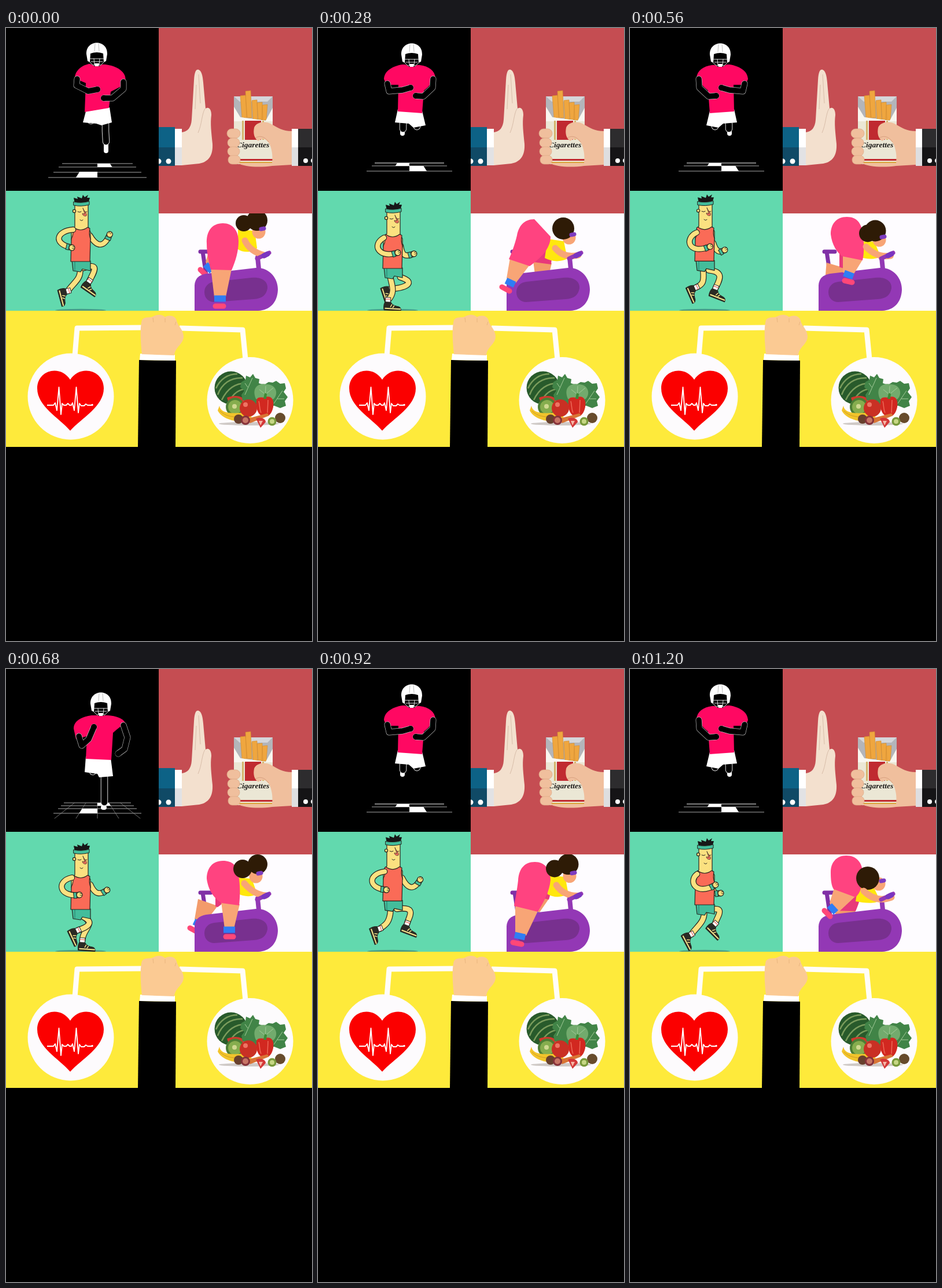
Animation of 529 by 1058 pixels, one loop 1.24 s. Source, as an HTML page with a canvas:

```html
<!DOCTYPE html>
<html lang="en">
<head>
<meta charset="utf-8">
<title>Healthy habits</title>
<style>
html,body{margin:0;width:100%;height:100%;overflow:hidden;background:#000}
svg,canvas{position:absolute;left:0;top:0;display:block}
</style>
</head>
<body>
<svg width="529" height="1058" viewBox="0 0 529 1058">
  <rect width="529" height="1058"/>
  <rect x="264" width="265" height="320" fill="#c54d52"/>
  <rect x="264" y="320" width="265" height="168" fill="#fefcff"/>
  <rect y="488" width="529" height="235" fill="#feea3b"/>

  <!-- refusing hand -->
  <path d="M264 171H292V238H264Z" fill="#0d6286"/>
  <path d="M264 206H292V238H264Z" fill="#104a66"/>
  <path d="M292 174H304V237H292Z" fill="#fff"/>
  <path d="M292 206H304V237H292Z" fill="#e2e2e4"/>
  <path d="M264 225.500A4.500 4.500 0 1 1 264 234.500Z" fill="#fff"/>
  <circle cx="281" cy="230" r="4.500" fill="#fff"/>
  <path d="M304 180C314 179 320 172 321 158L325 90C326 74 329 71 333 72C338 74 340 82 341 94L345 139C351 135 355 141 355 150C353 165 355 180 357 200C358 219 351 231 334 234L304 237Z" fill="#f3e0ce"/>
  <path d="M333 80L336 130M329 98L327 140M344 139C338 150 339 165 332 181" fill="none" stroke="#d8bda9"/>

  <!-- cigarette pack -->
  <path d="M394 118H461V160H394Z" fill="#b3b5ba"/>
  <path d="M394 118L404 127H452L461 118Z" fill="#d5d6da"/>
  <g fill="#efa63f" stroke="#d08a30" stroke-width=".6">
    <path d="M414 109L423 108L425 155L416 155ZM405 117L414 116L417 155L408 155ZM425 125L434 124L435 158L427 158ZM434 129L443 128L444 158L436 158ZM443 133L452 132L450 159L442 159Z"/>
  </g>
  <path d="M394 136L405 154L449 160L461 138V235H394Z" fill="#ebe7d5"/>
  <path d="M394 136L405 154L449 160L461 138V161H394Z" fill="#f8f6ef"/>
  <path d="M413 160H441V193H413Z" fill="#c02a30"/>
  <path d="M408 160H411V193H408ZM443 160H446V193H443Z" fill="#d3b46b"/>
  <path d="M394 226H461V229H394Z" fill="#c02a30"/>
  <path d="M394 231H461V233H394Z" fill="#d9a53c"/>
  <text x="399" y="206" font-family="'Liberation Serif',serif" font-size="13.500" font-weight="700" font-style="italic" fill="#1c1a18">Cigarettes</text>
  <path d="M494 178C478 178 470 172 457 165C446 160 432 163 429 172C427 182 429 190 436 195C444 188 451 192 456 201C461 213 461 225 460 233H400C412 240 438 241 460 238L494 236Z" fill="#f0bf9d"/>
  <path d="M431 190C440 184 449 189 454 197" fill="none" stroke="#d79f7e"/>
  <g fill="#f0bf9d" stroke="#dca684" stroke-width=".7">
    <rect x="382" y="174" width="23" height="16" rx="8"/><rect x="383" y="190" width="21" height="16" rx="8"/>
    <rect x="383" y="205" width="21" height="16" rx="8"/><rect x="384" y="220" width="21" height="15" rx="7"/>
  </g>
  <path d="M494 174H505V238H494Z" fill="#fff"/><path d="M494 206H505V238H494Z" fill="#dedee0"/>
  <path d="M505 174H529V238H505Z" fill="#2d2c2e"/><path d="M505 206H529V238H505Z" fill="#151416"/>
  <g fill="#fff"><circle cx="518" cy="229" r="4"/><circle cx="531" cy="229" r="4"/></g>

  <rect y="281" width="264" height="207" fill="#62d9ae"/>

  <!-- scales -->
  <path d="M119 566L123 518L240 517M300 518L409 521L414 572" fill="none" stroke="#fffdf8" stroke-width="9" stroke-linejoin="round"/>
  <g fill="#fdfbfd"><circle cx="112" cy="636" r="74.500"/><circle cx="422" cy="642.500" r="74.500"/></g>
  <path d="M111 695C92 673 54 653 54 622C54 590 94 580 111 607C128 580 169 590 169 622C169 653 131 673 111 695Z" fill="#fb0000"/>
  <path d="M71 651H82L85 647L88 660L91.500 620L95 667L97 648L100 651H104L107 648L110 651H113L115 647L118 660L121.500 620L125 664L127 648L130 652H135L138 649L141 651H149" fill="none" stroke="#fff" stroke-width="1.900" stroke-linejoin="round"/>
  <circle cx="149" cy="650.500" r="1.700" fill="#fff"/>
  <path d="M230 573L294 574L293 723H228Z"/>
  <path d="M232 562L292 564V574L231 573Z" fill="#fff"/>
  <path d="M235 563C233 545 231 518 235 504C240 497 249 501 254 498C261 494 270 494 275 499C283 494 293 497 295 505C297 515 306 519 307 532C307 546 292 550 291 565Z" fill="#fbca93"/>
  <path d="M254 500L255 508M275 501V508M294 507L292 513" fill="none" stroke="#e9b57f" stroke-width="1"/>

  <!-- produce -->
  <ellipse cx="420" cy="683" rx="52" ry="3" fill="#cfc9c6"/>
  <circle cx="389" cy="621" r="28.500" fill="#285a2b"/>
  <g fill="none" stroke="#7a9c5c" stroke-width="2.500"><path d="M363 622C370 606 384 597 400 597M366 633C373 614 388 603 409 604M373 642C382 623 396 613 415 613M386 645C393 630 404 623 417 623"/></g>
  <path d="M382 638C398 632 409 636 412 642L402 654L386 650Z" fill="#cf3a2e"/>
  <path d="M407 611L414 607L415 600L422 603L427 597L431 604L438 606L437 613L446 616L454 611L461 612L467 609L474 614L482 613L484 622L480 628L487 637L482 644L484 652L474 656L464 652L450 652L432 650L420 646L409 642L407 633L412 626L405 620Z" fill="#418447"/>
  <path d="M432 640C423 618 440 612 451 615C466 615 472 630 463 640C453 645 440 645 432 640Z" fill="#72ab6d"/>
  <path d="M413 633L426 604M418 620L413 613M448 641L449 618M449 633L438 624M449 632L462 621M463 648L478 626M469 640L481 640" stroke="#a3cb99" fill="none"/>
  <circle cx="396" cy="654" r="16" fill="#4d7e35"/><circle cx="396" cy="654" r="12" fill="#86ad4e"/><circle cx="395" cy="653" r="4" fill="#cfd990"/>
  <path d="M369 652C371 666 391 667 425 662L424 674C410 684 374 678 366 660Z" fill="#f2c42b"/>
  <path d="M370 661C382 673 402 673 422 668" fill="none" stroke="#d09a23"/>
  <circle cx="419" cy="656" r="15" fill="#c93024"/><circle cx="414" cy="650" r="4" fill="#ee7464"/>
  <path d="M433 642C436 635 443 639 448 637C459 634 464 641 462 654C459 668 453 671 447 669C439 672 431 661 433 642Z" fill="#d22820"/>
  <path d="M437 644C439 652 438 658 441 664M453 642L452 664" fill="none" stroke="#ed6a59" stroke-width="1.500"/>
  <path d="M445 640L447 630L451 631L450 640Z" fill="#3e8a35"/>
  <path d="M414 675L452 665L455 669L422 682Z" fill="#d97535"/>
  <circle cx="402" cy="675" r="8" fill="#68402d"/><circle cx="414" cy="677" r="8" fill="#86323a"/><circle cx="414" cy="677" r="5" fill="#c87566"/>
  <path d="M432 674C439 670 449 674 449 680L440 690Z" fill="#d43737"/><path d="M437 678L444 678L440 686Z" fill="#f6b5a5"/>
  <circle cx="474" cy="673" r="9" fill="#674b2c"/><circle cx="460" cy="679" r="7.500" fill="#78993b"/><circle cx="460" cy="679" r="4" fill="#c6d784"/>
</svg>
<canvas id="stage" width="529" height="488"></canvas>

<script>
const ctx = document.getElementById("stage").getContext("2d");
const LOOP = 1240, STEP = 40;
const NUM = /-?[\d.]+/g;

function mix(a, b, k) {
  const to = b.match(NUM);
  let i = 0;
  return a.replace(NUM, v => (+v + (to[i++] - v) * k).toFixed(2));
}
// keys: [time, parts joined by "|"], repeating after span
function pose(keys, t, span) {
  t %= span;
  let i = keys.length - 1;
  while (keys[i][0] > t) i--;
  const [t0, a] = keys[i], [t1, b] = keys[i + 1] || [span, keys[0][1]];
  return mix(a, b, (t - t0) / (t1 - t0)).split("|");
}
const list = s => s.match(NUM).map(Number);

function fill(d, color, edge, width = 1.2) {
  const p = new Path2D(d);
  ctx.fillStyle = color;
  ctx.fill(p);
  if (edge) line(d, edge, width);
}
function line(d, color, width, cap = "round") {
  ctx.strokeStyle = color;
  ctx.lineWidth = width;
  ctx.lineCap = cap;
  ctx.lineJoin = "round";
  ctx.stroke(new Path2D(d));
}
function limb(d, color, edge, width, rim = 2.4) {
  line(d, edge, width + rim);
  line(d, color, width);
}
function disc(x, y, r, color, edge) {
  ctx.beginPath();
  ctx.arc(x, y, r, 0, 7);
  ctx.fillStyle = color;
  ctx.fill();
  if (edge) { ctx.strokeStyle = edge; ctx.lineWidth = 1.2; ctx.stroke(); }
}
function placed(x, y, angle, draw) {
  ctx.save();
  ctx.translate(x, y);
  ctx.rotate(angle);
  draw();
  ctx.restore();
}
function clipped(x, y, w, h, draw) {
  ctx.save();
  ctx.beginPath();
  ctx.rect(x, y, w, h);
  ctx.clip();
  draw();
  ctx.restore();
}

// ---------- football player: five poses per step, every other step mirrored
// helmet | shirt | left arm | right arm | shorts | left leg | foot | right leg | foot
const fall = "157 25|M143 62C130 65 119 74 119 87L138 95L136 145L178 138L181 110L204 98C212 84 202 67 172 63Z|M123 88L122 99L142 109L158 106|M203 93L203 105L184 121L169 121|M138 144L179 137L183 163L165 168L156 165L133 163Z|M147 155L147 158L147 160|M147 158L147 159|M172 158L172 178L173 196|M173 202L173 212";
const stand = "164 40|M148 80C132 82 117 89 117 103L121 121L140 116L138 155L182 157L185 110L192 104L206 93C203 85 190 81 176 80Z|M126 116L131 132L143 121L152 100|M203 97L210 118L205 138L194 146|M138 151L181 153L185 185L161 187L158 181L136 178Z|M150 166L149 172L150 177|M150 165L150 166|M170 180L170 205L170 230|M168 239L170 239";
const rise = "162 29|M146 66C131 69 122 76 121 88L126 106L142 103L140 146L180 149L184 108L192 104L208 88C206 76 196 69 176 67Z|M130 103L130 116L148 109L159 90|M205 90L209 104L201 125L188 129|M141 143L180 145L187 171L163 175L158 168L137 165Z|M150 158L148 163L147 167|M146 176L147 178|M172 165L171 172L170 177|M168 184L169 190";
const reach = "162 26|M146 63C128 66 115 74 114 88L118 98L139 98L138 144L180 147L183 108L190 102L203 86C202 74 192 66 176 64Z|M120 96L123 109L146 107L160 103|M199 88L198 103L182 118L169 117|M138 140L180 143L186 168L165 172L157 165L133 163Z|M148 160L147 166L147 174|M146 180L146 182|M172 160L172 166L171 170|M172 162L172 163";
const strides = [fall, stand, rise, mix(rise, reach, .5), reach].map(s => s.split("|"));
// row heights | left tile | right tile | depth of the cross lines
const floors = ["234 240 249 258|248 258|234 240|0", "231 236 241 249|241 249|231 236|27",
  "233 238 246 261|238 246|246 261|28", "232 236 242 253|236 242|242 253|14",
  "233 233 238 247|233 238|238 247|0"].map(s => s.split("|").map(list));

const gridX = (k, y) => 158 + k * (y - 200) * .64;
function floor([rows, left, right, [deep]]) {
  for (const y of rows) {
    const w = 60 + (y - 233);
    line(`M${158 - w} ${y}H${158 + w}`, "#a8a8a8", 1, "butt");
  }
  for (let k = -2; deep && k <= 2; k++)
    line(`M${gridX(k, rows[0])} ${rows[0]}L${gridX(k, rows[0] + deep)} ${rows[0] + deep}`, "#8a8a8a", .8, "butt");
  for (const [k, [y1, y2]] of [[-1, left], [1, right]])
    fill(`M158 ${y1}H${gridX(k, y1)}L${gridX(k, y2)} ${y2}H158Z`, "#fff");
}
function helmet(x, y) {
  placed(x, y, 0, () => {
    fill("M-15 18H15L11 37L4 41H-4L-11 37Z", "#000");
    fill("M-18 20C-19 -6 19 -6 18 20L16 32L12 34L11 19Q0 15 -11 19L-12 34L-16 32Z", "#fff");
    line("M-3 2L-4 15M3 2L4 15", "#aaa", .8);
    line("M-12 28H12M-10 33H10M-5 28L-4 39M5 28L4 39M-13 33L-7 39H7L13 33", "#ddd", 1);
    fill("M-4 36H4L3 41H-3Z", "#fff");
  });
}
function player(t) {
  const i = Math.floor((t + 4) / 62);
  floor(floors[i % 5]);
  const [head, shirt, armL, armR, shorts, legL, footL, legR, footR] = strides[i % 5];
  ctx.save();
  if (Math.floor(i / 5) % 2) ctx.transform(-1, 0, 0, 1, 318, 0);
  for (const [leg, foot] of [[legL, footL], [legR, footR]]) {
    line(foot, "#fff", 8);
    limb(leg, "#000", "#ddd", 10.5, 2);
  }
  fill(shorts, "#fff");
  fill(shirt, "#ff0862");
  for (const arm of [armL, armR]) {
    limb(arm, "#000", "#b8b8b8", 9.5, 1.4);
    const [x, y] = list(arm).slice(-2);
    disc(x, y, 5, "#000");
  }
  helmet(...list(head));
  ctx.restore();
}

// ---------- jogger
const INK = "#25251f", SKIN = "#fbe180", TEAL = "#43bd9b";
const bob = [[0, "0"], [20, "-2"], [110, "-3"], [200, "4"], [260, "12"], [280, "12"], [360, "4"], [380, "2"]];
const nearArm = [
  [0, "M116 348C88 350 80 372 113 379"], [200, "M114 352C86 358 92 386 124 384"],
  [280, "M114 362C92 374 105 398 137 388"], [360, "M116 354C100 366 114 392 147 373"],
  [440, "M117 346C100 360 110 390 149 365"], [680, "M114 360C86 366 92 394 126 390"],
  [800, "M116 352C86 354 80 374 113 381"]];
const farArm = [
  [0, "M145 358C158 380 170 378 179 357"], [200, "M146 364C154 386 162 384 172 375"],
  [280, "M143 376C146 396 152 394 165 390"], [360, "M142 374C144 388 148 388 156 387"],
  [440, "M142 370C144 384 148 386 152 385"], [680, "M146 372C154 390 162 390 174 382"],
  [800, "M145 360C158 382 170 380 178 358"]];
// hip to ankle | foot angle
const stride = [
  [0, "M134 414C165 404 150 424 144 437|35"], [20, "M136 410C178 398 162 416 160 430|20"],
  [200, "M136 422C158 432 150 446 142 458|22"], [260, "M134 428C156 442 132 448 132 469|4"],
  [280, "M125 430C128 445 134 456 121 470|3"], [360, "M128 418C130 436 116 444 106 458|62"],
  [380, "M130 418C130 436 118 440 115 454|70"], [420, "M128 416C130 434 116 440 107 454|75"],
  [440, "M124 414C120 434 110 440 99 449|75"], [620, "M128 424C132 440 134 444 122 447|62"],
  [680, "M134 428C154 438 140 446 124 451|65"], [700, "M142 430C174 440 146 450 126 450|72"],
  [780, "M136 416C168 408 150 428 147 440|45"], [800, "M134 416C164 408 148 428 142 437|35"]];

function leg(t) {
  const [d, angle] = pose(stride, t, 840);
  const [x, y] = list(d).slice(-2);
  limb(d, SKIN, INK, 8.5);
  placed(x, y, angle * Math.PI / 180, () => {
    fill("M-4.500 -5H4.500V5H-4.500Z", "#fff", INK, 1);
    line("M-4 -2H4", "#e8604e", 1.2);
    fill("M-5 3L5 3C8 9 14 9 19 10Q24 12 23 17L-6 17Q-8 9 -5 3Z", "#2b2a24", INK, 1);
    line("M-4 14H22", "#f7e58c", 2);
    line("M7 7L5 11M11 9L9 12", "#f7e58c", 1.5);
  });
}
function arm(d) {
  const [cx, cy, x, y] = list(d).slice(-4);
  limb(d, SKIN, INK, 8);
  placed(x, y, Math.atan2(y - cy, x - cx), () => {
    fill("M-9 -5H-4V5H-9Z", TEAL, INK, 1);
    disc(1, 0, 5, SKIN, INK);
    line("M2 -2H5M2 1H5", INK, .8);
  });
}
function jogger(t) {
  ctx.beginPath();
  ctx.ellipse(129, 487, 44, 2.2, 0, 0, 7);
  ctx.fillStyle = "#4b9d86";
  ctx.fill();
  const dy = +pose(bob, t, 420)[0];
  arm(pose(farArm, t, 840)[0]);
  leg(t + 420);
  leg(t);
  placed(0, dy, 0, () => {
    fill("M114 401L146 402L146 419L132 416L129 421L116 419Z", TEAL, INK);
    line("M119 404V418", "#2f8f78", 1.5);
    fill("M119 303L119 343L113 352L113 366H146V352L142 343L142 303Z", SKIN, INK);
    fill("M117 344Q129 353 141 344L145 346Q143 356 146 364L145 403L112 403L113 364Q118 354 115 346Z", "#fa6b57", INK);
    fill("M119 303L117 293L124 295L123 291L131 294L133 288L136 292L142 288L140 293L145 293L142 303Z", "#171717");
    fill("M117 300Q130 303 144 299L144 305Q130 309 117 306Z", TEAL, INK, 1);
    disc(118, 316, 2.6, SKIN, INK);
    line("M124 317Q127 319 130 317M136 317Q138 319 140 317M128 331Q131 334 133 331", INK, 1);
    fill("M133 311C135 317 141 320 139 324C136 326 132 323 132 320L136 321Z", "#f2705c", INK, .7);
  });
  arm(pose(nearArm, t, 840)[0]);
}

// ---------- cyclist
const TAN = "#f8a576", PLUM = "#9338b5", PINK = "#ff4380";
// calf | sock | foot | shorts
const pedal = [
  [0, "M354 414L390 416L380 464L360 464Z|M360 467L380 467|M362 480L376 480|M375 337C355 337 346 352 347 372C347 390 351 405 354 417L390 418C397 402 402 385 402 368C402 350 392 337 375 337Z"],
  [120, "M341 408L380 418L360 460L341 455Z|M340 459L358 463|M337 472L352 475|M375 333C356 333 347 346 346 365C344 382 341 398 339 409L380 419C390 402 400 385 402 364C402 346 392 333 375 333Z"],
  [240, "M337 399L370 411L343 440L327 432Z|M326 436L340 442|M318 447L331 454|M374 330C356 330 347 342 345 358C342 375 338 390 334 401L370 412C381 402 390 393 395 386C400 375 402 368 402 360C402 342 392 330 374 330Z"],
  [280, "M332 397L366 409L342 440L326 432Z|M325 436L340 443|M318 447L331 454|M374 330C356 330 347 342 344 358C340 375 334 390 330 399L366 411C378 402 388 393 393 386C400 375 402 368 402 360C402 342 392 330 374 330Z"],
  [400, "M353 378L390 392L360 420L345 404Z|M345 408L356 420|M336 417L346 427|M374 322C356 322 347 335 347 350C347 364 348 374 352 380L390 394C399 385 402 375 402 352C402 335 392 322 374 322Z"],
  [440, "M360 376L393 390L370 418L354 403Z|M355 405L366 417|M345 416L353 426|M374 322C356 322 347 335 347 350C347 365 347 375 350 380L393 392C399 385 402 375 402 352C402 335 392 322 374 322Z"],
  [560, "M368 392L402 400L386 426L368 422Z|M370 423L386 429|M371 436L384 439|M375 326C356 326 347 339 347 356C349 374 358 388 367 394L402 401C405 388 405 370 402 353C400 337 392 326 375 326Z"],
  [680, "M372 402L404 406L394 448L378 448Z|M376 450L396 450|M380 462L393 462|M375 331C356 331 347 345 347 362C350 385 362 397 373 404L403 408C405 390 405 375 402 355C400 340 392 331 375 331Z"]];
// top | arm | bun | hair | face
const upper = [
  [0, "M401 348L430 350L434 380C425 388 410 388 401 382Z|M413 367Q422 386 446 392|411 337 14|434 332 18|437 352"],
  [240, "M398 363L425 368L431 394C420 402 405 402 392 395Z|M411 379Q426 396 450 391|407 352 16|431 342 18|433 363"],
  [280, "M397 364L425 368L431 398C420 404 405 404 392 397Z|M410 380Q425 398 450 392|420 346 14|424 346 19|434 362"],
  [400, "M394 376L420 374L432 399C425 406 405 404 390 401Z|M404 383Q425 404 452 394|410 362 14|411 361 20|430 371"],
  [440, "M395 377L420 375L432 400C425 407 405 405 390 402Z|M404 385Q425 405 452 395|413 364 14|413 363 20|430 374"],
  [680, "M403 360L425 362L434 388C425 394 410 393 402 388Z|M412 370Q428 389 449 391|409 345 16|435 337 17|432 358"]];

function shin(calf, sock, foot, skin) {
  fill(calf, skin);
  line(sock, "#2f7df5", 11, "butt");
  line(foot, "#ff4778", 9);
}
function cyclist(t) {
  const [top, reachArm, bun, hair, face] = pose(upper, t, 800);
  const [calf, sock, foot, hip] = pose(pedal, t, 800);
  const far = pose(pedal, t + 400, 800);
  line("M336 386H354M340 386L346 426", "#8030a6", 7);
  shin(far[0], far[1], far[2], "#f39b6b");
  // only the far thigh shows past the near hip
  clipped(362, 372, 60, 60, () => fill(far[3], "#e8397a"));
  fill("M326 488V444Q327 427 346 424L432 414C456 413 470 432 470 452C469 474 456 487 436 488Z", PLUM);
  fill("M360 438L424 431C443 429 453 438 452 449C450 461 443 467 428 468L360 473C350 473 343 466 343 456C343 446 350 439 360 438Z", "#78308f");
  line("M437 416L435 396", PLUM, 8);
  fill(top, "#ffe70d");
  shin(calf, sock, foot, TAN);
  fill(hip, PINK);
  const [fx, fy] = list(face);
  disc(fx, fy, 11.5, TAN);
  disc(...list(bun), "#2e1b06");
  disc(...list(hair), "#2e1b06");
  line(`M${fx + 4} ${fy - 5}L${fx + 9} ${fy - 6}`, "#7d3cc0", 7);
  line(reachArm, TAN, 11);
  line("M434 398L455 388", PLUM, 7);
  line("M446 393L452 390", "#7a35c0", 9);
}

const start = performance.now();
function frame() {
  const t = Math.floor((performance.now() - start) % LOOP / STEP) * STEP;
  ctx.clearRect(0, 0, 529, 488);
  player(t);
  jogger(t);
  clipped(264, 320, 265, 168, () => cyclist(t));
  requestAnimationFrame(frame);
}
frame();
</script>
</body>
</html>
```
